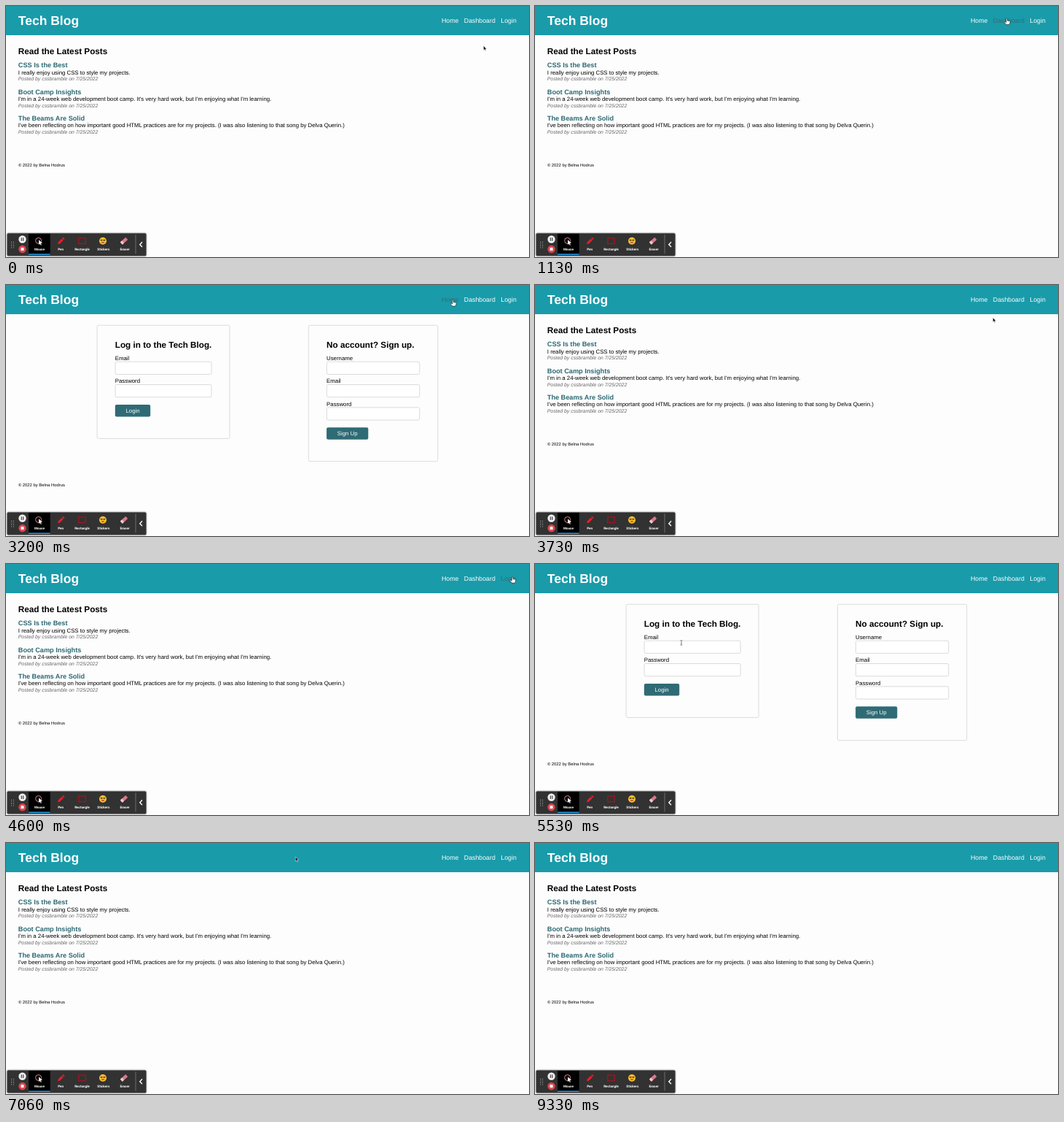
Write an HTML page that moves like this. It is 718x344 px and loops after 9.46 s.

```html
<!DOCTYPE html>
<html lang="en">
<head>
<meta charset="utf-8">
<title>Tech Blog</title>
<style>
  html, body { margin: 0; width: 100%; height: 100%; overflow: hidden; background: #fdfdfd; }
  svg { display: block; width: 100vw; height: 100vh; }
  text { font: 7.81px "Liberation Sans", Arial, sans-serif; text-rendering: geometricPrecision; white-space: pre; }
  .title { font-size: 17.5px; font-weight: 700; fill: #fff; }
  .nav text { font-size: 8.8px; fill: #fff; }
  .nav text.hover { fill: #386c75; }
  .h2 { font-size: 11.73px; font-weight: 700; }
  .h3 { font-size: 9.17px; font-weight: 700; fill: #2b6872; }
  .by { font-size: 6.86px; font-style: italic; fill: #666; }
  .foot { font-size: 5.87px; }
  .card { fill: none; stroke: #d4d4d4; stroke-width: .8; }
  .input { fill: #fff; stroke: #ccc; stroke-width: .7; }
  .button { fill: #2f6b75; }
  .on-button { fill: #fff; text-anchor: middle; }
  .tools text { font: 700 4.6px Roboto, "Open Sans", sans-serif; fill: #fff; text-anchor: middle; }
</style>
</head>
<body>
<svg viewBox="0 0 718 344" preserveAspectRatio="none">
  <defs>
    <filter id="shadow" x="-10%" y="-30%" width="120%" height="160%">
      <feDropShadow dx="0" dy="0" stdDeviation="1" flood-color="#000" flood-opacity=".55"/>
    </filter>
  </defs>

  <rect width="718" height="344" fill="#fdfdfd"/>
  <rect width="718" height="40" fill="#199baa"/>
  <text class="title" x="16.8" y="26">Tech Blog</text>
  <g class="nav">
    <text x="598" y="23">Home</text>
    <text x="628.8" y="23">Dashboard</text>
    <text x="679.3" y="23">Login</text>
  </g>

  <g id="home"></g>
  <g id="login"></g>

  <g class="tools">
    <rect x="1.5" y="311.5" width="191" height="31" rx="1.5" fill="#333" filter="url(#shadow)"/>
    <g id="grip" fill="#bbb"></g>
    <circle cx="22.5" cy="319.8" r="5.2" fill="#eee"/>
    <path d="M21.3 317.6v4.4M23.7 317.6v4.4" stroke="#333" stroke-width="1.1"/>
    <circle cx="22.5" cy="333.2" r="5.2" fill="#d9444f"/>
    <rect x="20.5" y="331.2" width="4" height="4" rx=".5" fill="#fff"/>

    <rect x="31" y="312" width="29.6" height="29" fill="#000"/>
    <rect x="31" y="339.6" width="29.6" height="1.5" fill="#1d9bf0"/>
    <circle cx="44.6" cy="321.6" r="4" fill="none" stroke="#d98b8f" stroke-width="1"/>
    <path d="M45 320.5l5 4.6-2.3.2 1.1 2.2-1.1.5-1-2.2-1.7 1.4z" fill="#fff"/>

    <path d="M71 326.6l.9-3.1 4.5-4.6 2.3 2.2-4.6 4.6zM77 318.2l1.4-1.3 2.2 2.1-1.3 1.4z" fill="#e3202b"/>
    <rect x="99.8" y="318" width="9.4" height="7.8" fill="none" stroke="#b5121b" stroke-width="1.1"/>

    <circle cx="133" cy="322" r="5" fill="#fbc02d"/>
    <path d="M129.4 320.2h3.1v1.6h-2.5zM133.5 320.2h3.1l-.6 1.6h-2.5z" fill="#4b3520"/>
    <path d="M130.4 323.5q2.6 3.6 5.2 0z" fill="#b5412a"/>

    <g transform="rotate(-42 162 322)">
      <rect x="157" y="319.8" width="10" height="4.4" rx=".7" fill="#d9788a"/>
      <rect x="157" y="319.8" width="3.2" height="4.4" rx=".7" fill="#f0c9d0"/>
    </g>
    <path d="M178 313.5v26" stroke="#888" stroke-width=".7"/>
    <path d="M187 323.6l-3.2 3.3 3.2 3.3" fill="none" stroke="#fff" stroke-width="1.4"/>
    <text x="45.9" y="334.8">Mouse</text>
    <text x="75.2" y="334.8">Pen</text>
    <text x="104.5" y="334.8">Rectangle</text>
    <text x="133.8" y="334.8">Stickers</text>
    <text x="163" y="334.8">Eraser</text>
  </g>

  <g id="cursor">
    <path id="arrow" d="M0 0v6.2l1.4-1.3 1 2.2 1-.5-1-2.1h2z" fill="#111" stroke="#fff" stroke-width=".5"/>
    <path id="hand" d="M-.8.6Q0-.5.8.6V3l3 .6q.9.3.8 1.3l-.6 2.3-.8 1.4h-3.6L-3 5.9q-.7-1 0-1.4.6-.3 1.3.4l.9.6z"
      fill="#fff" stroke="#111" stroke-width=".6" stroke-linejoin="round"/>
    <path id="beam" d="M-1.4-3.4Q0-3.4 0-2.4Q0-3.4 1.4-3.4M0-2.4V2.4M-1.4 3.4Q0 3.4 0 2.4Q0 3.4 1.4 3.4M-.7.9h1.4"
      fill="none" stroke="#444" stroke-width=".6"/>
  </g>
</svg>
<script>
const $ = id => document.getElementById(id);
const text = (cls, x, y, s) => `<text class="${cls}" x="${x}" y="${y}">${s}</text>`;
const rect = (cls, x, y, w, h, r = 2) =>
  `<rect class="${cls}" x="${x}" y="${y}" width="${w}" height="${h}" rx="${r}"/>`;
const footer = y => text('foot', 16.9, y, '© 2022 by Belna Hodrus');

const posts = [
  ['CSS Is the Best', 'I really enjoy using CSS to style my projects.'],
  ['Boot Camp Insights', "I'm in a 24-week web development boot camp. It's very hard work, but I'm enjoying what I'm learning."],
  ['The Beams Are Solid', "I've been reflecting on how important good HTML practices are for my projects. (I was also listening to that song by Delva Querin.)"]
];

$('home').innerHTML = text('h2', 16.8, 65.8, 'Read the Latest Posts') +
  posts.map(([title, body], i) => {
    const y = i * 36.25;
    return text('h3', 16.8, 84.3 + y, title) + text('', 16.8, 93.6 + y, body) +
      text('by', 16.8, 102.3 + y, 'Posted by cssbramble on 7/25/2022');
  }).join('') + footer(219.5);

function form(x, width, heading, labels, button, buttonWidth) {
  const bottom = 101.2 + labels.length * 31.35;
  return rect('card', x - 24.7, 55.2, width + 49.4, bottom - 8.7) +
    text('h2', x, 85.8, heading) +
    labels.map((label, i) => text('', x, 102.9 + i * 31.35, label) +
      rect('input', x + .3, 105.2 + i * 31.35, width - .6, 17.2)).join('') +
    rect('button', x, bottom, buttonWidth, 16.6) +
    text('on-button', x + buttonWidth / 2, bottom + 10.9, button);
}

$('login').innerHTML =
  form(149.8, 132.6, 'Log in to the Tech Blog.', ['Email', 'Password'], 'Login', 48.4) +
  form(440.1, 128, 'No account? Sign up.', ['Username', 'Email', 'Password'], 'Sign Up', 57.2) +
  footer(276.2);

for (let i = 0; i < 8; i++)
  $('grip').innerHTML += `<circle cx="${7.6 + i % 2 * 2.8}" cy="${323.5 + (i >> 1) * 2.5}" r=".6"/>`;

const LOOP = 9460;
// [time, x, y] of the pointer tip
const path = [
  [0, 655.5, 54.5], [60, 655.5, 54.5], [730, 652, 38], [930, 652, 38],
  [1130, 647.7, 17], [1260, 647.7, 17.5], [1860, 647.7, 17.5], [2130, 645, 21],
  [2400, 645, 21], [2800, 590, 82], [3200, 613.6, 20.5], [3330, 612, 19],
  [3400, 612, 19], [3800, 632, 50], [4330, 688, 24], [4400, 688, 24],
  [4600, 695.2, 17.5], [4800, 695.2, 17.5], [5000, 690, 30], [5530, 201, 108],
  [5730, 190, 112], [5800, 190, 112], [6200, 60, 19], [6730, 60, 19],
  [7060, 396.7, 19], [7400, 600, 6], [8400, 600, 6], [8800, 640, -12], [LOOP, 640, -12]
];
const pages = [[0, 'home'], [1930, 'login'], [3470, 'home'], [4870, 'login'], [6530, 'home']];
const links = [[597, 622], [628, 673], [679, 702]];
const nav = document.querySelectorAll('.nav text');
const show = (el, on) => { el.style.display = on ? '' : 'none'; };
const within = (v, a, b) => v >= a && v <= b;

function pointer(t) {
  const i = path.findIndex(p => p[0] > t);
  const [t0, x0, y0] = path[i - 1], [t1, x1, y1] = path[i];
  const k = (t - t0) / (t1 - t0);
  return [x0 + (x1 - x0) * k, y0 + (y1 - y0) * k];
}

function draw(t) {
  const page = pages.filter(p => p[0] <= t).pop()[1];
  const [x, y] = pointer(t);
  show($('home'), page === 'home');
  show($('login'), page === 'login');

  const hovered = within(y, 14, 26) ? links.findIndex(([a, b]) => within(x, a, b)) : -1;
  nav.forEach((el, i) => el.classList.toggle('hover', i === hovered));

  const onTitle = within(x, 17, 101) && within(y, 10, 30);
  const onInput = page === 'login' && within(x, 150, 282) && within(y, 105, 122.5);
  const kind = hovered >= 0 || onTitle ? 'hand' : onInput ? 'beam' : 'arrow';
  for (const id of ['arrow', 'hand', 'beam']) show($(id), id === kind);
  $('cursor').setAttribute('transform', `translate(${x} ${y})`);
}

const start = performance.now();
function frame() {
  draw((performance.now() - start) % LOOP);
  requestAnimationFrame(frame);
}
frame();
</script>
</body>
</html>
```
